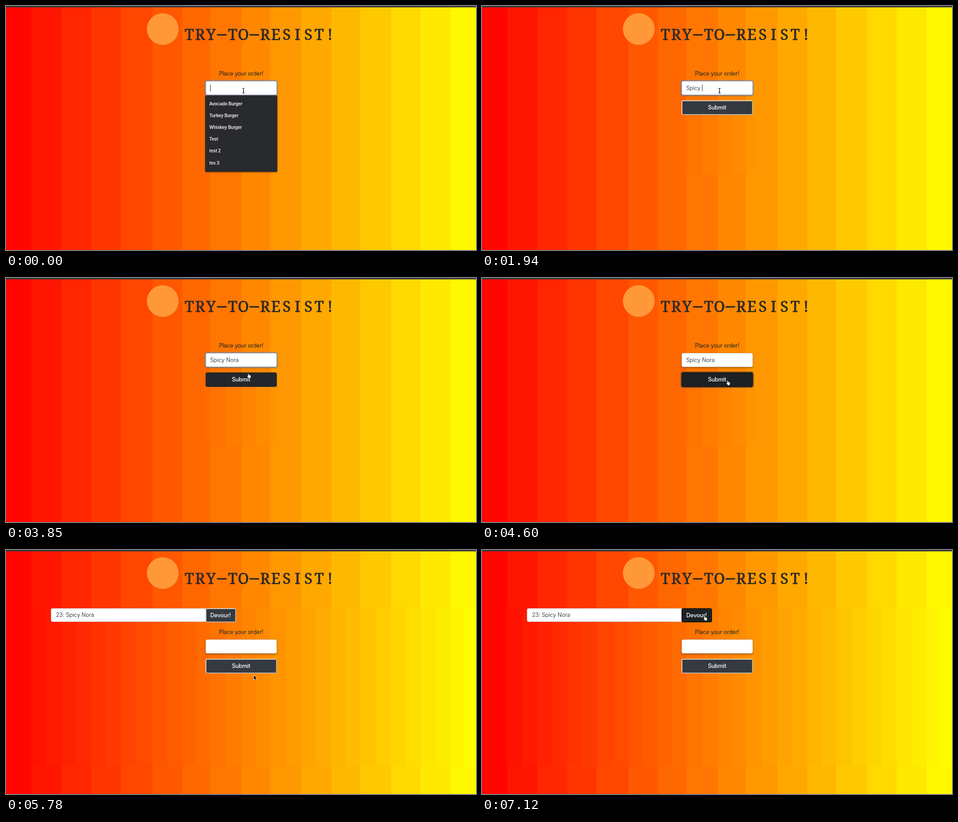
An HTML page that plays this animation: 1036x540 px, repeating every 8000 ms.

```html
<!DOCTYPE html>
<html lang="en">
<head>
<meta charset="utf-8">
<title>Order page</title>
<style>
html, body { margin: 0; width: 100%; height: 100%; overflow: hidden; }
body { position: relative; font: 12.5px/20px Inter, sans-serif; letter-spacing: -.2px; color: #212529; }
div, svg { position: absolute; box-sizing: border-box; white-space: pre; }
#coarse, #fine, #art { inset: 0; width: 1036px; height: 540px; }
#bar { left: 0; top: 0; width: 1036px; height: 3px; background: #35363a; }
#form { left: 439.5px; top: 140px; width: 157.5px; }
#label { top: 0; width: 100%; text-align: center; }
#input, #item { background: #fff; color: #495057; border: 1px solid #ced4da; border-radius: 3.5px; }
#input { top: 26px; width: 100%; height: 31px; padding-left: 9.5px; box-shadow: 0 2px 4px #0005; }
#input.focus { border-color: #80bdff; box-shadow: 0 0 0 2.6px #5a86d066, 0 2px 4px #0003; }
#typed { position: absolute; top: 7px; height: 15px; line-height: 15px; border-right: 1px solid transparent; }
#typed.caret { border-color: #222; }
.button { background: #343a40; color: #fff; border: 1px solid; border-color: #fff #c8c8c8 #c8c8c8 #fff;
  border-radius: 3.5px; text-align: center; line-height: 29px; font-weight: 500; box-shadow: inset 0 0 0 1px #fff6; }
.button.hover { background: #23272b; border-color: #1d2124; box-shadow: none; }
.button.press { background: #1d2124; border-color: #000; box-shadow: none; }
#submit { top: 69px; width: 100%; height: 32px; }
#submit.press { box-shadow: 0 0 0 2.6px #343a4080; }
#item { left: 99px; top: 128.5px; width: 341px; height: 30px; padding-left: 10px; line-height: 28px; border-radius: 3.5px 0 0 3.5px; }
#devour { left: 439.5px; top: 128.5px; width: 67px; height: 31px; }
#menu { left: 439px; top: 197.5px; width: 159px; height: 169px; padding: 6px 9px; background: #292a2d; color: #f1f1f2;
  border-radius: 3px; box-shadow: 0 1px 3px #0008; font-size: 9.8px; line-height: 26.2px; font-weight: 600; letter-spacing: -.22px; }
#pointer { left: 0; top: 0; width: 20px; height: 20px; overflow: visible; }
#pointer path { stroke-linejoin: round; }
</style>
</head>
<body>
<div id="coarse"></div>
<div id="fine"></div>
<div id="bar"></div>
<svg id="art">
  <circle cx="345.5" cy="51" r="35" fill="#ff9838"/>
  <text id="title" y="75" font-family="Noto Serif, serif" font-size="33" text-anchor="middle" fill="#2b2a29" stroke="#2b2a29" stroke-width=".9"></text>
</svg>
<div id="item">23: Spicy Nora</div>
<div id="devour" class="button">Devour!</div>
<div id="form">
  <div id="label">Place your order!</div>
  <div id="input"><span id="typed"></span></div>
  <div id="submit" class="button">Submit</div>
</div>
<div id="menu">Avocado Burger
Turkey Burger
Whiskey Burger
Test
test 2
tes 3</div>
<svg id="pointer">
  <path id="beam" d="M-2.5-5.5Q0-5.5 0-4Q0-5.5 2.5-5.5M0-4V4M-2.5 5.5Q0 5.5 0 4Q0 5.5 2.5 5.5M-1.5 1.5H1.5" fill="none" stroke="#111" stroke-width="1.2"/>
  <path id="arrow" d="M0 0V10.5L2.4 8.3L4 12L5.8 11.2L4.2 7.6H7.4Z" fill="#000" stroke="#fff" stroke-width=".8"/>
  <path id="hand" d="M-1 1Q0-.8 1.1 1L1.8 4.2Q3-.1 3 4.3Q4.5 3.3 4.7 4.9Q6.3 4.2 6.2 6.3L5.5 10V11.8H.2V10.4L-3 6.6Q-2.8 5 -.8 6.4Z" fill="#fff" stroke="#000" stroke-width=".9"/>
</svg>
<script>
const $ = id => document.getElementById(id);
const LOOP = 8000, WORD = 'Spicy Nora', SAVED = 4890;
const KEYS = [740, 1340, 1490, 1640, 1790, 1940, 2380, 2680, 2825, 2970];
const EDGES = [0, 56, 122, 188, 253, 323, 388, 450, 520, 582, 651, 717, 781, 849, 914, 980, 1036];

// start, steps, from x y, to x y, easing power
const MOVES = [
  [3410, 5, 523.5, 187.5, 541, 226, 1],
  [5490, 3, 541, 226, 548.5, 302.5, 1],
  [6230, 7, 548.5, 302.5, 490.5, 145, 4]
];

function bands(split) {
  const stops = [];
  const add = (a, b) => stops.push(`rgb(255 ${Math.round(255 * (a + b) / 2072)} 0) ${a}px ${b}px`);
  for (let i = 0; i < 16; i++) {
    const a = EDGES[i], b = EDGES[i + 1], mid = (a + b) / 2;
    if (split && i) { add(a, mid); add(mid, b); }
    else add(a, b);
  }
  return `linear-gradient(90deg, ${stops})`;
}
$('coarse').style.background = bands(false);
$('fine').style.background = bands(true);

$('title').innerHTML = [...'TRY-TO-RESIST!'].map((c, i) => {
  const x = 404 + 23.85 * i;
  return c === '-' ? `<tspan x="${x}" font-size="40">–</tspan>` : `<tspan x="${x}">${c}</tspan>`;
}).join('');

function pointerAt(t) {
  const [start, steps, x0, y0, x1, y1, power] = MOVES.filter((m, i) => !i || t >= m[0]).pop();
  const step = t < start ? 0 : Math.min(steps, Math.floor((t - start + 4) / 149) + 1);
  const p = 1 - (1 - step / steps) ** power;
  return [x0 + (x1 - x0) * p, y0 + (y1 - y0) * p];
}

const show = (id, on) => $(id).style.display = on ? '' : 'none';
const flag = (id, name, on) => $(id).classList.toggle(name, on);

function draw(t) {
  const saved = t >= SAVED, shift = saved ? 32 : 0;
  const [x, y] = pointerAt(t);
  const over = (left, top, right, bottom) => x > left && x < right && y > top && y < bottom;

  $('fine').style.clipPath = saved ? 'inset(128px 0 62px 0)'
    : t >= 740 ? 'inset(241px 437px 169px 437px)' : 'inset(100%)';
  show('menu', t < 740);
  show('item', saved);
  show('devour', saved);
  $('form').style.top = 140 + shift + 'px';

  $('typed').textContent = saved ? '' : WORD.slice(0, KEYS.filter(k => t >= k).length);
  flag('typed', 'caret', t < 290 || t >= 740 && t < 3410 || t >= 4000 && t < 4450);
  flag('input', 'focus', t < 4450);

  const onSubmit = over(440, 209 + shift, 597, 241 + shift);
  const onDevour = saved && over(440, 128, 507, 160);
  flag('submit', 'hover', onSubmit);
  flag('submit', 'press', t >= 4450 && !saved);
  flag('devour', 'hover', onDevour);
  flag('devour', 'press', t >= 7115);

  const resting = saved && t < 5490;
  const kind = onSubmit || onDevour || resting ? 'hand'
    : over(440, 166 + shift, 597, 197 + shift) ? 'beam' : 'arrow';
  for (const k of ['beam', 'arrow', 'hand']) show(k, k === kind);
  $('pointer').style.transform = `translate(${x}px, ${y}px)`;
}

const begin = performance.now();
function tick() {
  draw((performance.now() - begin) % LOOP);
  requestAnimationFrame(tick);
}
tick();
</script>
</body>
</html>
```
